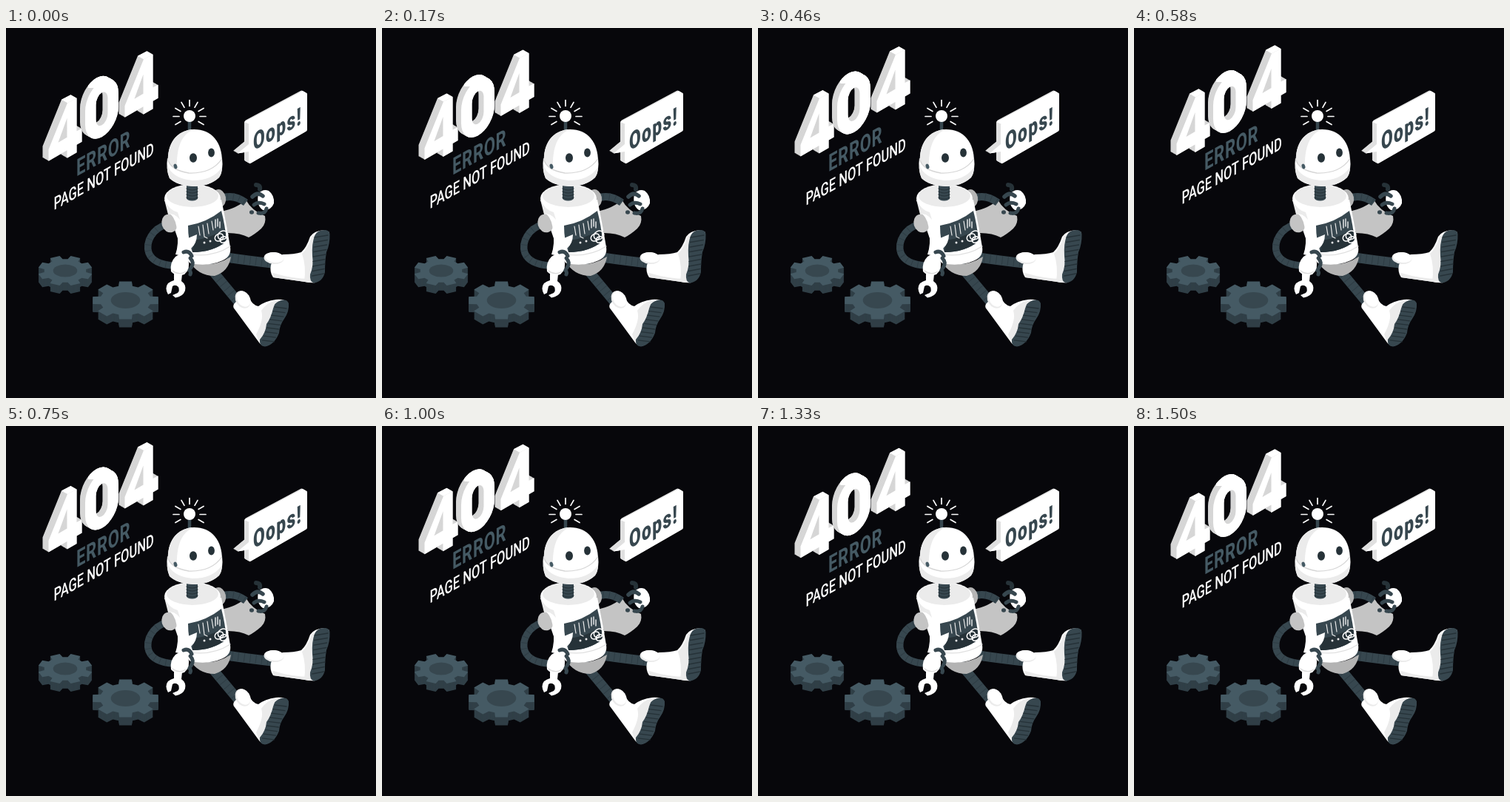
An HTML page with a canvas for the animation above (1.54 s loop, 500 px wide and 500 px high).

```html
<!DOCTYPE html>
<html lang="en">
<head>
<meta charset="utf-8">
<title>404</title>
<style>
html, body { margin: 0; width: 100%; height: 100%; overflow: hidden; background: #07070b; }
canvas { display: block; width: 500px; height: 500px; }
</style>
</head>
<body>
<canvas id="stage" width="500" height="500"></canvas>
<script>
const ctx = document.getElementById('stage').getContext('2d');
const LOOP = 1540, LIFT = 9.5, LEAD = 30;
const BG = '#07070b', WHITE = '#fff', PALE = '#ebebeb', SIDE = '#d6d6d6', GREY = '#c4c4c4';
const SLATE = '#455a64', STEEL = '#37474f', DARK = '#263238';
const TAU = Math.PI * 2;

function fill(d, color) {
  ctx.fillStyle = color;
  ctx.fill(new Path2D(d), 'evenodd');
}

function line(d, color, width, cap = 'round') {
  ctx.strokeStyle = color;
  ctx.lineWidth = width;
  ctx.lineCap = cap;
  ctx.lineJoin = 'round';
  ctx.stroke(new Path2D(d));
}

function oval(x, y, rx, ry, color, turn = 0) {
  ctx.fillStyle = color;
  ctx.beginPath();
  ctx.ellipse(x, y, rx, ry, turn, 0, TAU);
  ctx.fill();
}

function at(x, y, draw) {
  ctx.save();
  ctx.translate(x, y);
  draw();
  ctx.restore();
}

// Text lying on the right-hand isometric plane
function isoText(text, x, y, font, color, spacing = 0) {
  ctx.save();
  ctx.transform(0.69, -0.385, 0, 1, x, y);
  ctx.font = font + ' Roboto, sans-serif';
  ctx.letterSpacing = spacing + 'px';
  ctx.fillStyle = color;
  ctx.fillText(text, 0, 0);
  ctx.restore();
}

// Stacked copies running back to the upper left
function extrude(path, dx, dy, color) {
  ctx.fillStyle = color;
  const steps = 16;
  for (let i = steps; i >= 0; i--) {
    at(dx * i / steps, dy * i / steps, () => ctx.fill(path, 'evenodd'));
  }
}

function face(path) {
  ctx.fillStyle = WHITE;
  ctx.fill(path, 'evenodd');
}

const four = new Path2D('M83 101.500L95.500 95V139.500L102.500 136V154L95.500 158V168.500L82.500 176V165.500L57.500 180V164.500Z' +
  'M82.500 122V148L70.500 155Z');

const zero = new Path2D();
{
  const upright = new Path2D();
  const ring = (rx, ry, radius) => upright.roundRect(-rx, -ry, rx * 2, ry * 2, radius);
  ring(22.5, 38, { x: 22.5, y: 29 });
  ring(8, 22, { x: 8, y: 12 });
  zero.addPath(upright, new DOMMatrix([1, -0.55, 0, 1, 129.5, 109.5]));
}

function drawFour() {
  extrude(four, -8, -4.6, SIDE);
  fill('M75 96.900L87.500 90.400L95.500 95L83 101.500Z', WHITE);
  face(four);
}

function drawZero() {
  extrude(zero, -7, -4, SIDE);
  // The upward-facing rim catches the light
  ctx.save();
  ctx.beginPath();
  ctx.rect(111, 50, 50, 31);
  ctx.clip();
  extrude(zero, -7, -4, WHITE);
  ctx.restore();
  face(zero);
}

function drawTitle() {
  drawFour();
  drawZero();
  at(103, -59, drawFour);
  isoText('ERROR', 95, 201, 'bold 32px', SLATE, 1);
  isoText('PAGE NOT FOUND', 64.5, 246.5, '500 24px', WHITE);
}

function gearPath(rx, ry, phase) {
  const p = new Path2D();
  const step = TAU / 8;
  for (let i = 0; i < 8; i++) {
    const a = i * step + phase;
    for (const [off, r] of [[-0.27, 0.77], [-0.19, 1], [0.19, 1], [0.27, 0.77]]) {
      p.lineTo(Math.cos(a + off) * rx * r, Math.sin(a + off) * ry * r);
    }
  }
  p.closePath();
  return p;
}

function drawGear(x, y, rx, ry, depth, phase) {
  const solid = gearPath(rx, ry, phase);
  at(x, y, () => {
    ctx.fillStyle = '#303f47';
    for (let i = depth; i > 0; i--) at(0, i, () => ctx.fill(solid));
    ctx.fillStyle = SLATE;
    ctx.fill(solid);
    oval(0, 0, rx * 0.44, ry * 0.42, STEEL);
  });
}

function drawBubble() {
  const panel = new Path2D('M328 132Q328 129 331 127.500L404 88.500Q407 87 407 90V137Q407 139 404 140.500L331 182.500Q328 184 328 181V167L313 169.500L328 157Z');
  extrude(panel, -6, -3.5, '#e0e0e0');
  fill('M322 127L401 85L406 88L329 130Z', WHITE);
  face(panel);
  isoText('Oops!', 334, 166, '900 33px', STEEL, 2);
}

// Ribbed tube: dark stroke with fine cross lines
function tube(d, width) {
  line(d, STEEL, width, 'butt');
  ctx.save();
  ctx.setLineDash([1, 7]);
  line(d, '#2e3c44', width, 'butt');
  ctx.restore();
}

function drawLegs() {
  tube('M298 310Q325 314 360 318', 13);
  fill('M358 320Q361 313 374 306Q390 306 399 303Q406 297 411 282Q416 274 430 273L437 276L418 344Q413 345 404 343L361 337Q356 330 358 320Z', WHITE);
  fill('M413 281Q409 297 400 305Q406 322 403 343L414 344Q418 325 415 306Q413 291 417 280Z', PALE);
  fill('M361 331Q387 339 412 339L412 344L404 343L361 337Z', PALE);
  fill('M424 274Q436 271 437.500 278Q438 292 433 303Q431 315 431 330Q428 343 416 344.500Q410 343 411 333Q416 321 414 308Q413 291 417 281Q419 276 424 274Z', STEEL);
  for (let i = 0; i < 9; i++) {
    const y = 283 + i * 6.5;
    line(`M${417 - i * 0.4} ${y}L${435 - i * 0.7} ${y - 3}`, DARK, 1.3);
  }
  oval(362, 311, 13.5, 8, PALE, 0.1);
  oval(363, 310, 12.5, 7, WHITE, 0.1);

  tube('M273 321L313 369', 13);
  fill('M308 373Q315 363 329 364Q332 374 341 376Q350 369 365 367Q376 366 381 371L352 430Q346 430 342 425L309 380Q306 377 308 373Z', WHITE);
  fill('M365 368Q352 371 345 382Q349 394 338 414L343 426L348 424Q351 412 352 400Q358 392 361 379Q363 371 369 368Z', PALE);
  fill('M369 369Q379 365 382 372Q383 383 376 393Q370 401 369 412Q363 428 350 430.500Q342 430 343 421Q351 412 352 400Q358 392 361 379Q363 371 369 369Z', STEEL);
  for (let i = 0; i < 9; i++) {
    const y = 377 + i * 5.6;
    line(`M${363 - i * 2.1} ${y}L${379 - i * 2.1} ${y + 2}`, DARK, 1.3);
  }
  oval(320, 367, 9.5, 12.5, PALE, -0.55);
  oval(321, 366, 8.5, 11.5, WHITE, -0.55);
}

function drawRightArm() {
  fill('M290 248Q314 243 324 232Q332 247 350 254Q352 264 345 271Q336 279 328 283Q317 277 300 277Z', GREY);
  tube('M291 230Q308 224 324 236', 10);
  oval(288, 230, 9, 12, '#b5b5b5', -0.2);
  fill('M341 224Q347 217 355 220Q363 226 362 237Q358 247 347 246Q338 240 341 224Z', WHITE);
  line('M338 212Q344 212 343 218', DARK, 6);
  line('M333 228Q340 221 347 227', STEEL, 5.5);
  line('M335 239Q341 234 349 238M341 250Q350 252 352 244', STEEL, 5);
  oval(332, 249, 3, 2.8, STEEL);
}

function drawTorso() {
  fill('M248 315Q277 326 304 309Q301 329 282 335Q259 335 248 315Z', '#b3b3b3');
  fill('M214 232H291Q297 260 303 296Q305 308 293 314Q273 323 249 318Q238 309 234 290Z', WHITE);
  fill('M214 232Q220 246 232 249L236 262Q226 256 219 252Z', PALE);
  oval(252, 230, 38, 19, WHITE);
  oval(252, 227, 35, 15, PALE);
  line('M250 306Q280 310 303 295', '#dedede', 1.2);

  fill('M246 267Q271 263 291 247Q296 266 298 288Q280 303 252 303Q246 288 246 267Z', STEEL);
  fill('M254 287Q276 284 296 272L298 288Q280 303 252 303Z', DARK);
  line('M260 268L262 280M266 266L268 282L272 284M272 264L274 278M278 261L280 273', PALE, 1.2);
  line('M283 259V270M286 258V268M289 262V270', WHITE, 1.3);
  oval(268, 290, 1.5, 1.5, PALE);
  oval(276, 288, 1.5, 1.5, PALE);
  for (const [x, y, r] of [[288, 283, 6], [293, 280, 7], [294, 286, 5]]) {
    ctx.beginPath();
    ctx.ellipse(x, y, r, r * 0.8, -0.5, 0, TAU);
    ctx.strokeStyle = WHITE;
    ctx.lineWidth = 1.5;
    ctx.stroke();
  }
}

function drawLeftArm() {
  tube('M218 265C198 271 188 289 193 304Q199 319 226 321', 9.5);
  oval(221, 264, 10.5, 12.5, GREY, -0.3);
  fill('M222 251Q232 252 240 266L246 284L258 279Q258 291 250 298L244 309L229 306Q234 291 231 276Q231 260 222 251Z', WHITE);
  line('M240 303Q247 300 251 308M249 311Q255 317 250 324M245 326Q251 328 249 333', STEEL, 5);
  fill('M229 309Q239 301 246 312Q250 325 241 333Q230 337 223 329Q221 317 229 309Z', WHITE);
  line('M225 328Q234 335 243 329', '#dcdcdc', 1.3);
  fill('M227 332L238 333L237 342Q244 347 242 355Q239 363 229 364.500L225 361L232 358Q235 355 233 350Q229 346 225 349L223 358L219 360Q214 351 219 345Q223 342 227 341Z', WHITE);
}

function drawHead() {
  line('M251.500 209V231', STEEL, 15, 'butt');
  oval(251.5, 230, 7.5, 3.5, STEEL);
  for (let y = 217; y < 232; y += 4) line(`M244 ${y}Q252 ${y + 4} 259 ${y}`, DARK, 1.2);

  line('M248 124V146', STEEL, 4.5, 'butt');
  oval(248, 119, 8, 8, WHITE);
  for (let i = 0; i < 9; i++) {
    const a = (150 + i * 30) * Math.PI / 180;
    const c = Math.cos(a), s = Math.sin(a);
    line(`M${248 + c * 14} ${119.5 + s * 14}L${248 + c * 22} ${119.5 + s * 22}`, WHITE, 1.7);
  }

  fill('M219 184C217 155 231 138 254 137C278 137 292 154 292 181L270 200H235Z', WHITE);
  fill('M219 184C217 155 231 138 254 137C238 143 230 160 231 190Z', PALE);
  fill('M218 176Q222 192 247 196Q278 197 292 176Q294 192 288 202Q275 214 254 214Q231 213 221 203Q216 191 218 176Z', WHITE);
  fill('M218 184Q223 203 252 206Q280 206 292 188Q292 197 288 202Q275 214 254 214Q231 213 221 203Q217 194 218 184Z', PALE);
  line('M218.500 177Q222 192 247 196Q278 197 291.500 177', '#d6d6d6', 1.3);
  oval(229, 187, 2.3, 3.5, SLATE, -0.3);
  oval(253, 175.5, 5, 6.2, DARK);
  oval(277.5, 168.5, 4.4, 6, DARK);
}

function drawScene() {
  drawGear(80, 328, 37, 20.5, 11, TAU / 16);
  drawGear(161.5, 368, 45, 26, 11, 0);
  drawBubble();
  drawLegs();
  drawRightArm();
  drawTorso();
  drawLeftArm();
  drawHead();
}

// Softened rise and fall, 0 at rest and 1 at the top
function hover(ms) {
  const p = ((ms + LEAD) / LOOP) % 1;
  const ramp = 1 - Math.abs(1 - 2 * p);
  const wave = (1 - Math.cos(TAU * p)) / 2;
  return (ramp + wave) / 2;
}

function frame() {
  ctx.fillStyle = BG;
  ctx.fillRect(0, 0, 500, 500);
  drawScene();
  at(0, -LIFT * hover(performance.now() % LOOP), drawTitle);
  requestAnimationFrame(frame);
}
frame();
</script>
</body>
</html>
```
